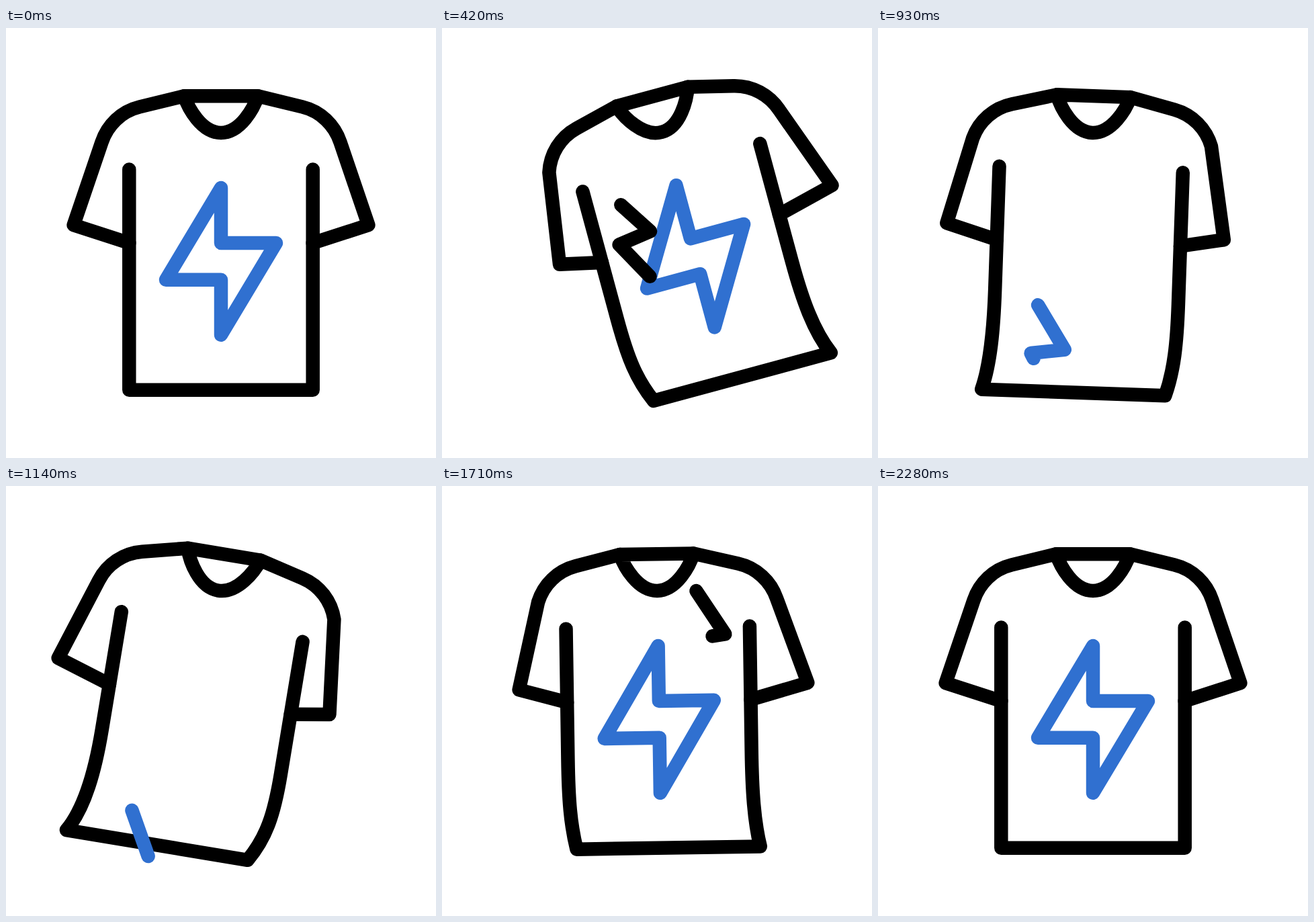
An HTML page that plays this animation: 640 px wide and 640 px high, repeating every 3150 ms.

```html
<!DOCTYPE html>
<html lang="en">
<head>
<meta charset="utf-8">
<title>Swinging shirt</title>
<style>
  html, body { margin: 0; width: 100%; height: 100%; overflow: hidden; background: #fff; }
  svg { display: block; width: 100%; height: 100%; }
  path { fill: none; stroke: #000; stroke-width: 20.5; stroke-linecap: round; stroke-linejoin: round; }
  .blue { stroke: #3070d0; }
</style>
</head>
<body>
<svg viewBox="0 0 640 640">
  <g id="shirt">
    <path d="M265.3 101.2H374.7C369 119 349 155.9 320 155.9S271 119 265.3 101.2Z"/>
    <path id="left"/>
    <path id="right"/>
    <path id="body"/>
    <path id="bolt" class="blue" pathLength="1" d="M320 456.8V374.7H238L320 238V320H402Z"/>
  </g>
</svg>
<script>
const LOOP = 3150, STEP = 30;
const $ = id => document.getElementById(id);

// each swing ends at [time, angle]; big swings to either side also bend the cloth
const swings = [[0, 0], [618, -20], [1090, 10], [1505, -5], [1870, 2], [2280, 0]];
const bendLeft = ([, angle]) => angle <= -5 ? 1 : 0;
const bendRight = ([, angle]) => angle >= 5 ? 1 : 0;

const ease = (t, from, span) => {
  const s = Math.min(1, Math.max(0, (t - from) / span));
  return s * s * (3 - 2 * s);
};

function swingAt(t) {
  const i = Math.max(1, swings.findLastIndex(s => s[0] <= t) + 1);
  const a = swings[i - 1], b = swings[i] || a;
  const k = ease(t, a[0], b[0] - a[0] || 1);
  return [s => s[1], bendLeft, bendRight].map(f => f(a) + (f(b) - f(a)) * k);
}

const sparks = [[157, 223, 229], [737, 248, 415], [1558, 378, 157]].map(([at, x, y], i) => {
  const el = $("bolt").cloneNode();
  el.removeAttribute("id");
  el.setAttribute("class", i === 1 ? "blue" : "");
  el.setAttribute("d", `M${x} ${y}l42 65l-50 7l42 76`);
  $("shirt").append(el);
  return { el, at };
});

// show only the stretch of a path between two fractions of its length
function trim(el, start, end) {
  const len = end - start;
  el.style.display = len > 0.0005 ? "" : "none";
  el.style.strokeDasharray = len >= 1 ? "none" : `${len} 2`;
  el.style.strokeDashoffset = -start;
}

// side = -1 for left, 1 for right
function sleeve(side, dx, dy) {
  const p = (x, y) => `${320 + side * x} ${y}`;
  return `M${p(54.7, 101.2)}L${p(121, 117.4)}C${p(148, 124)} ${p(169, 144)} ${p(177.5, 170)}` +
    `L${p(219.4 - dx, 293.3 + dy)}L${p(136.7, 320)}`;
}

function draw(t) {
  const [angle, l, r] = swingAt(t);
  $("shirt").setAttribute("transform", `rotate(${angle} 320 129)`);
  $("left").setAttribute("d", sleeve(-1, 28 * l, 17 * l));
  $("right").setAttribute("d", sleeve(1, 27 * r - 6 * l, 18 * r + 7 * l));

  const dx = 27 * l - 30 * r, hem = 538.8 + 6 * r;
  const x1 = 183.3, x2 = 456.7, y1 = 400 + dx * 0.4, y2 = 400 - dx * 0.4;
  $("body").setAttribute("d",
    `M${x1} 210.6V${y1}C${x1} ${y1 + 60} ${x1 + dx / 5} ${hem - 38} ${x1 + dx} ${hem}` +
    `H${x2 + dx}C${x2 + dx / 5} ${hem - 38} ${x2} ${y2 + 60} ${x2} ${y2}V210.6`);

  if (t < 1000) trim($("bolt"), ease(t, 430, 300), 1);
  else trim($("bolt"), 0, ease(t, 1150, 330));

  for (const { el, at } of sparks) trim(el, ease(t, at + 204, 326), ease(t, at, 326));
}

const origin = performance.now();
function tick() {
  const t = (performance.now() - origin) % LOOP;
  draw(Math.floor(t / STEP) * STEP);
  requestAnimationFrame(tick);
}
tick();
</script>
</body>
</html>
```
